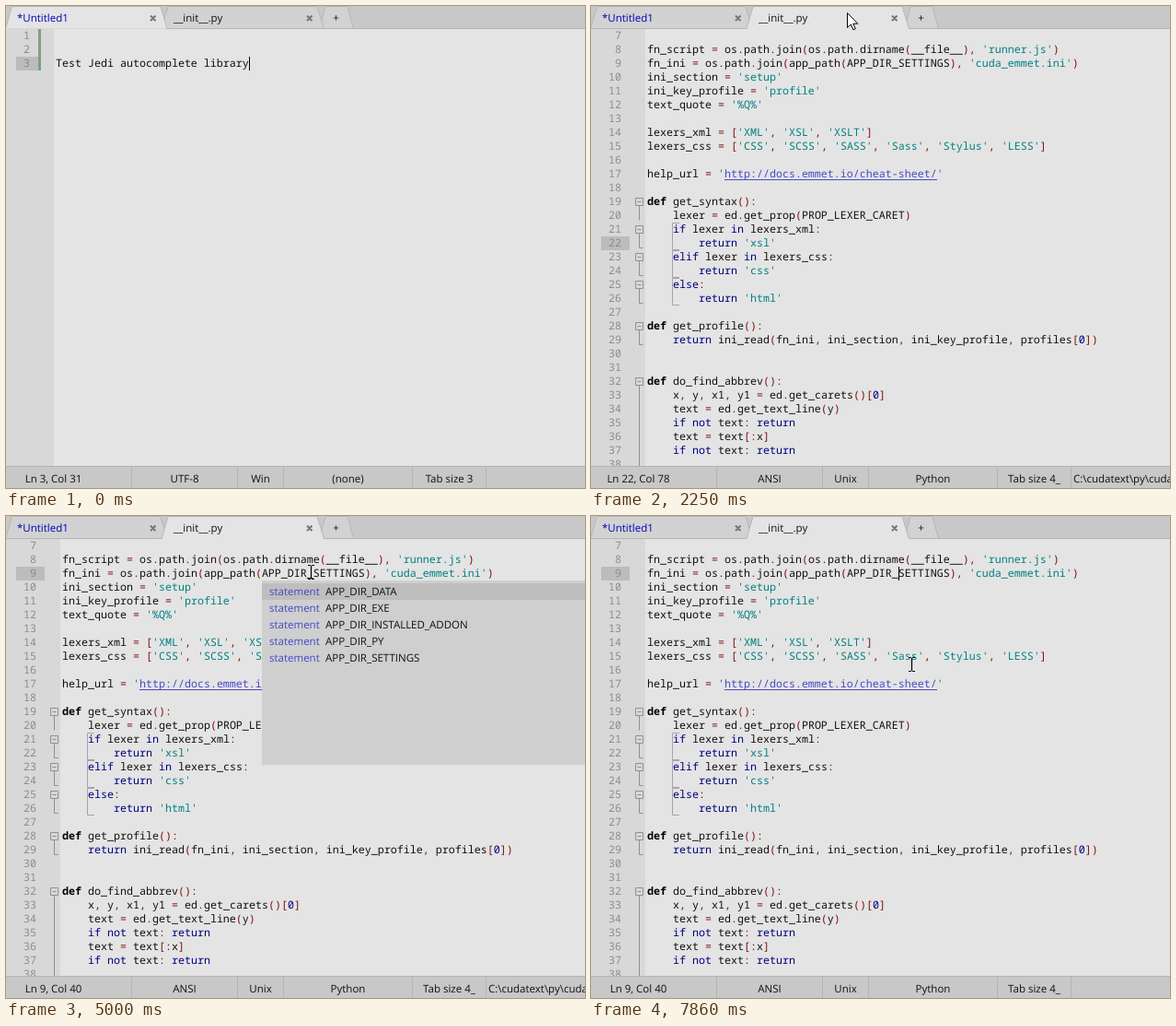
An HTML page that plays this animation: 629 px wide and 523 px high, repeating every 8000 ms.

```html
<!DOCTYPE html>
<html lang="en">
<head>
<meta charset="utf-8">
<title>Code editor autocomplete</title>
<style>
html, body { margin: 0; width: 100%; height: 100%; overflow: hidden; background: #e4e4e4; }
svg { display: block; width: 629px; height: 523px; }
text { white-space: pre; text-rendering: geometricPrecision; }
.ui text { font: 11.5px "Open Sans", sans-serif; fill: #101010; }
.code text { font: 11.667px "Noto Sans Mono", monospace; fill: #101010; }
.code .num { fill: #8c8c8c; text-anchor: end; }
.mid { text-anchor: middle; }
.ui .dirty { fill: #0000b8; }
.ui .kind { fill: #4646c8; }
.def { font-weight: bold; fill: #000; }
.kw, .dig { fill: #000080; }
.str { fill: #008080; }
.sym { fill: #801010; }
.url { fill: #4a4ac8; }
.gutter { fill: #d8d8d8; }
.row { fill: #bcbcbc; }
.caret { fill: #000; }
.line { fill: none; stroke: #909090; }
.staple { fill: none; stroke: #aaa0ae; }
.tab { fill: #d2d2d2; stroke: #b6b6b6; }
.tab.on { fill: #e4e4e4; }
.cross { stroke: #747474; stroke-width: 2; }
.loop { animation: 8s step-end infinite; }

.first { animation-name: first; }
.second { animation-name: second; }
.before { animation-name: before; }
.after { animation-name: after; }
.hover { animation-name: hover; }
.path { animation-name: path; }
.popup { animation-name: popup; }
.pick { animation-name: pick; }
.blinkA { animation-name: blinkA; }
.blinkB { animation-name: blinkB; }
.blinkC { animation-name: blinkC; }
.pointer { animation-name: move; }
.arrow { animation-name: arrow; }
.beam { animation-name: beam; }

@keyframes first { 0% { opacity: 1 } 28.1%, 100% { opacity: 0 } }
@keyframes second { 0% { opacity: 0 } 28.1%, 100% { opacity: 1 } }
@keyframes before { 0% { opacity: 1 } 57.1%, 100% { opacity: 0 } }
@keyframes after { 0% { opacity: 0 } 57.1%, 100% { opacity: 1 } }
@keyframes hover { 0% { opacity: 0 } 20%, 100% { opacity: 1 } }
@keyframes path { 0% { opacity: 0 } 20.8% { opacity: 1 } 96.2%, 100% { opacity: 0 } }
@keyframes popup { 0% { opacity: 0 } 62.4% { opacity: 1 } 96.2%, 100% { opacity: 0 } }
@keyframes pick { 0% { transform: none } 74.2%, 100% { transform: translateY(18px) } }
@keyframes blinkA { 0% { opacity: 1 } 1.9% { opacity: 0 } 9% { opacity: 1 } 16%, 100% { opacity: 0 } }
@keyframes blinkB {
  0% { opacity: 0 } 30.2% { opacity: 1 } 37.8% { opacity: 0 }
  44.9% { opacity: 1 } 52.3%, 100% { opacity: 0 }
}
@keyframes blinkC {
  0% { opacity: 0 } 57.1% { opacity: 1 } 60.6% { opacity: 0 } 68.1% { opacity: 1 }
  75.2% { opacity: 0 } 83.2% { opacity: 1 } 91.1% { opacity: 0 } 98.2%, 100% { opacity: 1 }
}
@keyframes arrow {
  0% { opacity: 1 } 1.85% { opacity: 0 } 20% { opacity: 1 }
  34.8% { opacity: 0 } 70.1% { opacity: 1 } 96.2%, 100% { opacity: 0 }
}
@keyframes beam {
  0% { opacity: 0 } 1.85% { opacity: 1 } 20% { opacity: 0 }
  34.8% { opacity: 1 } 70.1% { opacity: 0 } 96.2%, 100% { opacity: 1 }
}
@keyframes move {
  0% { transform: translate(550px, 545px) }
  .85% { transform: translate(550px, 545px); animation-timing-function: steps(10, start) }
  10.85% { transform: translate(332px, 110px); animation-timing-function: steps(7, start) }
  17.95% { transform: translate(298px, 60px); animation-timing-function: steps(4, start) }
  22% { transform: translate(279px, 15px); animation-timing-function: steps(3, start) }
  25% { transform: translate(278px, 7px) }
  32.7% { transform: translate(278px, 7px); animation-timing-function: steps(7, start) }
  40% { transform: translate(344px, 60px) }
  42.8% { transform: translate(344px, 60px); animation-timing-function: steps(4, start) }
  47% { transform: translate(340px, 60px) }
  52.3% { transform: translate(340px, 60px); animation-timing-function: steps(4, start) }
  56.2% { transform: translate(334px, 60px) }
  60.6% { transform: translate(330px, 60px) }
  70.1% { transform: translate(330px, 60px); animation-timing-function: steps(4, start) }
  74.2% { transform: translate(343px, 107px); animation-timing-function: steps(2, start) }
  76.2% { transform: translate(345px, 150px) }
  79.1% { transform: translate(345px, 152px) }
  83.2% { transform: translate(345px, 152px); animation-timing-function: steps(2, start) }
  85.2%, 100% { transform: translate(347px, 160px) }
}
</style>
</head>
<body>
<svg viewBox="0 0 629 523">
  <defs>
    <path id="tab1" d="M-.5 24.5L6.5.5H168L175 24.5"/>
    <path id="tab2" d="M169 24.5L176 .5H338L345.500 24.5"/>
    <clipPath id="view"><rect y="25" width="629" height="474"/></clipPath>
  </defs>
  <rect width="629" height="523" fill="#e4e4e4"/>

  <g class="code loop first">
    <rect class="gutter" y="25" width="52" height="474"/>
    <rect class="row" x="11" y="55" width="24" height="15"/>
    <rect x="35" y="25" width="3" height="45" fill="#80a080"/>
    <g id="blank"></g>
    <text x="54" y="66">Test Jedi autocomplete library</text>
    <rect class="caret loop blinkA" x="264" y="55" width="1" height="15"/>
  </g>

  <g class="loop second" clip-path="url(#view)">
    <rect class="gutter" y="25" width="59" height="474"/>
    <rect class="row loop before" x="11" y="250" width="31" height="15"/>
    <rect class="row loop after" x="11" y="55" width="31" height="15"/>
    <g id="folds"></g>
    <g id="source" class="code"></g>
    <rect class="caret loop blinkB" x="600" y="250" width="1" height="15"/>
    <rect class="caret loop blinkC" x="334" y="55" width="1" height="15"/>
  </g>

  <g class="ui">
    <rect width="629" height="25" fill="#c8c8c8"/>
    <path class="tab" d="M340.500 24.5L347 .5H371L377.500 24.5"/>
    <g class="loop first">
      <use href="#tab2" class="tab"/>
      <use href="#tab2" class="tab loop hover" style="fill:#dadada"/>
      <path class="line" d="M175 24.5H629" style="stroke:#b6b6b6"/>
      <use href="#tab1" class="tab on"/>
    </g>
    <g class="loop second">
      <use href="#tab1" class="tab"/>
      <path class="line" d="M0 24.5H629" style="stroke:#b6b6b6"/>
      <use href="#tab2" class="tab on"/>
      <path d="M170 24.5H345" stroke="#e4e4e4"/>
    </g>
    <text class="dirty" x="12" y="17">*Untitled1</text>
    <text x="182" y="17">__init__.py</text>
    <text class="mid" x="358.500" y="17">+</text>
    <path class="cross" d="M157 10.500l5.500 5.500m0-5.500l-5.500 5.500M327 10.500l5.500 5.500m0-5.500l-5.500 5.500"/>
  </g>

  <g class="ui">
    <rect y="499" width="629" height="24" fill="#c8c8c8"/>
    <path class="line" style="stroke:#b4b4b4" d="M0 499.500H629M136.500 500V523M251.500 500V523M301.500 500V523M441.500 500V523M521.500 500V523"/>
    <g id="status1" class="loop first"><text class="mid" x="51.500" y="517">Ln 3, Col 31</text></g>
    <g id="status2" class="loop second">
      <text class="mid loop before" x="51.500" y="517">Ln 22, Col 78</text>
      <text class="mid loop after" x="51.500" y="517">Ln 9, Col 40</text>
    </g>
    <text class="loop path" x="524" y="517">C:\cudatext\py\cuda_emmet</text>
  </g>

  <g id="popup" class="ui loop popup">
    <rect x="278" y="70" width="351" height="200" fill="#cfcfcf"/>
    <rect class="loop pick" x="278" y="73" width="351" height="18" fill="#bebebe"/>
  </g>

  <g class="loop pointer">
    <path class="loop arrow" d="M.5.5V16.500L4.300 13L6.900 18.800L9.300 17.700L6.800 12.200H11.800Z" fill="#fff" stroke="#000"/>
    <path class="loop beam" d="M-2-6.500H1M2-6.500H5M1.500-6V8M-2 8.500H1M2 8.500H5" fill="none" stroke="#000" stroke-width="1.200"/>
  </g>
</svg>
<script>
const code = `
fn_script = os.path.join(os.path.dirname(__file__), 'runner.js')
fn_ini = os.path.join(app_path(APP_DIR_SETTINGS), 'cuda_emmet.ini')
ini_section = 'setup'
ini_key_profile = 'profile'
text_quote = '%Q%'

lexers_xml = ['XML', 'XSL', 'XSLT']
lexers_css = ['CSS', 'SCSS', 'SASS', 'Sass', 'Stylus', 'LESS']

help_url = 'http://docs.emmet.io/cheat-sheet/'

def get_syntax():
    lexer = ed.get_prop(PROP_LEXER_CARET)
    if lexer in lexers_xml:
        return 'xsl'
    elif lexer in lexers_css:
        return 'css'
    else:
        return 'html'

def get_profile():
    return ini_read(fn_ini, ini_section, ini_key_profile, profiles[0])


def do_find_abbrev():
    x, y, x1, y1 = ed.get_carets()[0]
    text = ed.get_text_line(y)
    if not text: return
    text = text[:x]
    if not text: return
`.split("\n");

const byId = id => document.getElementById(id);
const add = (id, markup) => byId(id).insertAdjacentHTML("beforeend", markup);
const span = (cls, s) => `<tspan class="${cls}">${s}</tspan>`;
const label = (cls, x, y, s) => `<text class="${cls}" x="${x}" y="${y}">${s}</text>`;
const rowTop = n => 25 + (n - 7) * 15;

function paint(s) {
  if (s[0] === "'") {
    const body = s.slice(1, -1);
    return body.startsWith("http")
      ? span("str", "'") + span("url", body) + span("str", "'")
      : span("str", s);
  }
  if (s === "def") return span("def", s);
  if (/^(if|elif|else|in|not|return)$/.test(s)) return span("kw", s);
  if (/^\d/.test(s)) return span("dig", s);
  return /^\w/.test(s) ? s : span("sym", s);
}

code.forEach((s, i) => {
  const n = i + 7, y = rowTop(n) + 11;
  const body = s.replace(/'[^']*'|\w+|[^\w\s]/g, paint);
  add("source", label("num", 33, y, n) + label("", 61, y, body));
});
add("source", `<path d="M145 188.500H376" stroke="#4a4ac8"/>`);

for (let n = 1; n < 4; n++) add("blank", label("num", 26, 25 + n * 15 - 4, n));

// Fold boxes: first line, last line, whether the block closes with a tick
const fold = (a, b, tick) => {
  const y = rowTop(a) + 7.5, end = rowTop(b) + 12.5;
  add("folds", `<path class="line" d="M52.500 ${y + 4}V${end}${tick ? "h4" : ""}"/>
    <path class="line" fill="#e4e4e4" d="M48.500 ${y - 4}h8v8h-8zM50.500 ${y}h4"/>`);
};
fold(19, 20, false);
[21, 23, 25, 28].forEach(n => fold(n, n + 1, true));
fold(32, 38, false);
[21, 23, 25].forEach(n =>
  add("folds", `<path class="staple" d="M96 ${rowTop(n) + .5}H88.500v29H96"/>`));

const centers = [194, 276.5, 371.5, 481.5];
const fill = (id, cells) => cells.forEach((s, i) => add(id, label("mid", centers[i], 517, s)));
fill("status1", ["UTF-8", "Win", "(none)", "Tab size 3"]);
fill("status2", ["ANSI", "Unix", "Python", "Tab size 4_"]);

["DATA", "EXE", "INSTALLED_ADDON", "PY", "SETTINGS"].forEach((s, i) => {
  const y = 86 + i * 18;
  add("popup", label("kind", 286, y, "statement") + label("", 347, y, "APP_DIR_" + s));
});
</script>
</body>
</html>
```
